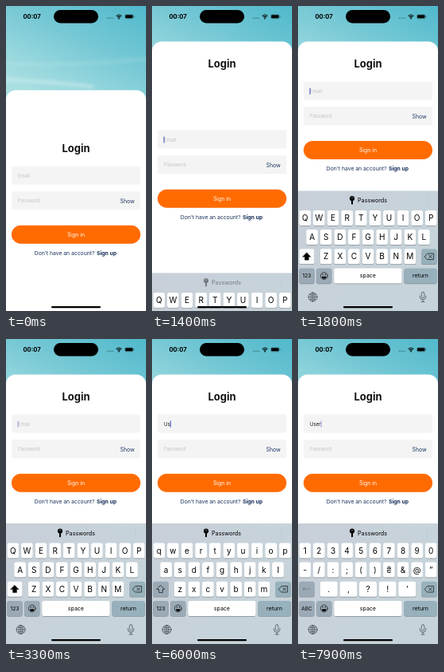
Write an HTML page that moves like this. It is 176x382 px and loops after 8 s.

```html
<!DOCTYPE html>
<html lang="en">
<head>
<meta charset="utf-8">
<title>Login</title>
<style>
html, body { margin: 0; height: 100%; overflow: hidden; background: #fff; }
svg { display: block; width: 176px; height: 382px; font-family: Inter, "DejaVu Sans", sans-serif; }
.mid { text-anchor: middle; }
.line { fill: none; stroke: #222; stroke-width: .8; stroke-linecap: round; stroke-linejoin: round; }
</style>
</head>
<body>
<svg viewBox="0 0 176 382">
  <defs>
    <linearGradient id="sky" x1="1" y1="0" x2=".3" y2="1">
      <stop offset="0" stop-color="#50b9cc"/>
      <stop offset=".47" stop-color="#78c9d5"/>
      <stop offset=".8" stop-color="#99d8de"/>
      <stop offset="1" stop-color="#a9dfe1"/>
    </linearGradient>
    <linearGradient id="tray" x2="1" y2=".6">
      <stop offset="0" stop-color="#c8cfd8"/>
      <stop offset="1" stop-color="#c6d4da"/>
    </linearGradient>
    <linearGradient id="dim" gradientUnits="userSpaceOnUse" x1="0" y1="0" x2="176" y2="0">
      <stop offset="0" stop-color="#9ba9b5"/>
      <stop offset="1" stop-color="#97b2bd"/>
    </linearGradient>
    <filter id="soft"><feGaussianBlur stdDeviation="2"/></filter>
  </defs>
  <rect width="176" height="120" fill="url(#sky)"/>
  <g fill="none" stroke="#d5eff0" stroke-width="3" filter="url(#soft)">
    <path d="M-5 92 Q50 94 110 101" opacity=".8"/>
    <path d="M-5 72 Q80 76 180 66" opacity=".25"/>
  </g>

  <text x="21.5" y="16.2" font-size="7.6" font-weight="700">00:07</text>
  <rect x="60" y="5" width="56" height="16.5" rx="8.2"/>
  <g fill="#356f7a">
    <circle cx="127.5" cy="15.3" r=".7"/><circle cx="129.7" cy="15.3" r=".7"/>
    <circle cx="131.9" cy="15.3" r=".7"/><circle cx="134.1" cy="15.3" r=".7"/>
  </g>
  <path d="M138.6 12.6 Q142 9.4 145.4 12.6 M139.9 14.2 Q142 12.2 144.1 14.2" fill="none" stroke="#000" stroke-width="1.1"/>
  <circle cx="142" cy="15.5" r=".9"/>
  <rect x="149.4" y="10.7" width="10.6" height="5.2" rx="1.6" fill="none" stroke="#35636b" stroke-width=".5"/>
  <rect x="150" y="11.3" width="9.4" height="4" rx="1"/>
  <rect x="160.6" y="12.3" width=".8" height="2" rx=".4" fill="#35636b"/>

  <g id="sheet"><rect width="176" height="400" rx="12" fill="#fff"/></g>
  <g id="title"><text class="mid" x="88" font-size="12.9" font-weight="700" fill="#111">Login</text></g>

  <g id="form">
    <rect x="7" y="-11.5" width="162" height="23" rx="2" fill="#f4f4f4"/>
    <rect x="7" y="20.3" width="162" height="23" rx="2" fill="#f4f4f4"/>
    <text id="hint" x="15" y="2.7" font-size="6" fill="#c3c3c5">Email</text>
    <text id="value" x="15" y="2.7" font-size="6.1" fill="#111"></text>
    <rect id="caret" y="-3.4" width="1" height="8" fill="#3349b8"/>
    <text x="15" y="34.2" font-size="5.9" fill="#c3c3c5">Password</text>
    <text x="143.6" y="34.6" font-size="6.9" fill="#1b3560">Show</text>
    <rect x="7" y="62.7" width="162" height="23" rx="11.5" fill="#ff6b00"/>
    <text class="mid" x="88" y="76.8" font-size="6.9" fill="#fff">Sign in</text>
    <g font-size="6.8" fill="#16305a">
      <text x="35.8" y="99.6">Don't have an account?</text>
      <text x="114" y="99.6" font-weight="700">Sign up</text>
    </g>
  </g>

  <g id="board"></g>
  <rect x="57" y="376" width="62" height="2.3" rx="1.1"/>
</svg>
<script>
const $ = id => document.getElementById(id);
const PITCH = 17.6, ROW_Y = [255.5, 279.6, 303.8, 328];
const DIM = 'url(#dim)';

const key = (x, y, w, label = '', size = 10, fill = '#fff', ink = '#000') =>
  `<rect x="${x}" y="${y + .7}" width="${w}" height="19" rx="2.6" fill="#858c92"/>
   <rect x="${x}" y="${y}" width="${w}" height="19" rx="2.6" fill="${fill}"/>
   <text class="mid" x="${x + w / 2}" y="${y + 9.5 + size * .36}" font-size="${size}" fill="${ink}">${label}</text>`;

// A centred row of keys
const row = (chars, n, pitch = PITCH, w = 14.7) => [...chars].map((c, i) =>
  key(88 + (i - (chars.length - 1) / 2) * pitch - w / 2, ROW_Y[n], w, c)).join('');

const letters = rows => rows.map((r, i) => row(r, i)).join('');
const lower = ['qwertyuiop', 'asdfghjkl', 'zxcvbnm'];

const shift = on => key(1.4, ROW_Y[2], 19.2, '', 10, on ? '#f8fafb' : DIM) +
  `<path class="line" d="M11 308.6 l4.8 5 h-2.5 v4 h-4.6 v-4 h-2.5z" ${on ? 'style="fill:#000"' : ''}/>`;

$('board').innerHTML = `
  <rect y="231" width="176" height="152" fill="url(#tray)"/>
  <path d="M162.4 237 v11" stroke="#b9c3ca" stroke-width=".5"/>
  <g id="bar">
    <circle cx="68" cy="240.6" r="3.1"/><path d="M67 242 h2 v5.2 l-1 1.2 -1 -1.2z"/>
    <circle cx="68" cy="239.6" r=".7" fill="#cbd3d9"/>
    <text x="75" y="245.6" font-size="7.2">Passwords</text>
  </g>
  <g id="upper">${letters(lower.map(r => r.toUpperCase()))}${shift(true)}</g>
  <g id="lower">${letters(lower)}${shift(false)}</g>
  <g id="digits">
    ${row('1234567890', 0)}${row('-/:;()₴&@”', 1)}${row('.,?!’', 2, 24.6, 22)}
    ${key(1.4, ROW_Y[2], 19.2, '#+=', 5.4, DIM, '#66737c')}
  </g>
  ${key(155.2, ROW_Y[2], 19.4, '', 10, DIM)}
  <path class="line" d="M159.4 313.3 l3.4 -3.8 h7.6 v7.6 h-7.6z M164.6 311.5 l3.6 3.6 m0 -3.6 l-3.6 3.6"/>
  <g id="toDigits">${key(1.4, ROW_Y[3], 19.2, '123', 6.8, DIM)}</g>
  <g id="toLetters">${key(1.4, ROW_Y[3], 19.2, 'ABC', 6.4, DIM)}</g>
  ${key(23.2, ROW_Y[3], 19.2, '', 10, DIM)}
  <circle class="line" cx="32.8" cy="337.5" r="4.4"/>
  <path d="M30 338.2 h5.6 a2.8 2.8 0 0 1 -5.6 0z"/>
  <circle cx="31.2" cy="335.8" r=".7"/><circle cx="34.4" cy="335.8" r=".7"/>
  ${key(45.2, ROW_Y[3], 85.4, 'space', 7)}
  ${key(133.4, ROW_Y[3], 41.2, 'return', 7, DIM)}
  <g class="line" style="stroke:#4b5359">
    <circle cx="18.6" cy="364" r="5.5"/><ellipse cx="18.6" cy="364" rx="2.5" ry="5.5"/>
    <path d="M13.1 364 h11 M18.6 358.5 v11 M14.4 361 q4.2 1.6 8.4 0 M14.4 367 q4.2 -1.6 8.4 0"/>
    <rect x="155.2" y="357.8" width="3.6" height="7.4" rx="1.8"/>
    <path d="M153.2 362.6 v1 a3.8 3.8 0 0 0 7.6 0 v-1 M157 367.4 v2.6 m-2 0 h4"/>
  </g>
  <g id="popup">
    <path d="M-9 -29 h18 q4 0 4 4 v15 q0 3.5 -2.6 5.5 q-3.1 2.6 -3.1 6 v15 q0 2.5 -2.5 2.5 h-9.6 q-2.5 0 -2.5 -2.5 v-15 q0 -3.4 -3.1 -6 q-2.6 -2 -2.6 -5.5 v-15 q0 -4 4 -4z"
      fill="#fff" stroke="#d3d9dd" stroke-width=".3"/>
    <text id="popChar" class="mid" x="-.5" y="-11" font-size="15.5"></text>
  </g>`;

// Key presses: [char, column, row, down, up]
const presses = [['U', 6, 0, 4500, 4700], ['s', 1, 1, 5400, 5500],
                 ['e', 2, 0, 6200, 6300], ['r', 3, 0, 6700, 6900]];
const FOCUS = 1300, DIGITS = 7900;

const show = (id, on) => $(id).style.display = on ? '' : 'none';
const move = (id, x, y) => $(id).setAttribute('transform', `translate(${x} ${y})`);

// Share of the slide still to go: a critically damped spring
function slideLeft(t) {
  const x = Math.max(0, t - FOCUS - 33) * .017;
  return (1 + x) * Math.exp(-x);
}

// Solid for a second after focus or typing, then blinking every second
function caretAlpha(t, since) {
  const rest = t - since, phase = rest % 1000;
  if (rest < 0) return 0;
  if (rest < 1000 || phase > 700) return 1;
  return phase === 0 || phase === 700 ? .5 : 0;
}

function draw(t) {
  const open = t >= FOCUS, left = slideLeft(t);
  move('sheet', 0, open ? 44.5 : 105.5);
  move('title', 0, open ? 77.4 : 183);
  move('form', 0, open ? 106 + 89 * left : 212);
  move('board', 0, 151 * left);
  $('bar').setAttribute('opacity', Math.min(1, 1.1 - left));

  const typed = presses.filter(p => t >= p[4]);
  const text = typed.map(p => p[0]).join('');
  $('value').textContent = text;
  show('hint', !text);
  $('caret').setAttribute('x', text ? 15 + $('value').getComputedTextLength() : 14.6);
  $('caret').setAttribute('opacity', caretAlpha(t, text ? typed.at(-1)[4] : FOCUS));

  const digits = t >= DIGITS;
  show('upper', !text);
  show('lower', text && !digits);
  show('digits', digits);
  show('toDigits', !digits);
  show('toLetters', digits);

  const down = presses.find(p => t >= p[3] && t < p[4]);
  show('popup', down);
  if (down) {
    const [char, col, r] = down;
    move('popup', 8.8 + (col + r / 2) * PITCH, ROW_Y[r]);
    $('popChar').textContent = char;
  }
}

// The screen updates ten times a second
function tick() {
  draw(Math.floor(performance.now() % 8000 / 100) * 100);
  requestAnimationFrame(tick);
}
tick();
</script>
</body>
</html>
```
